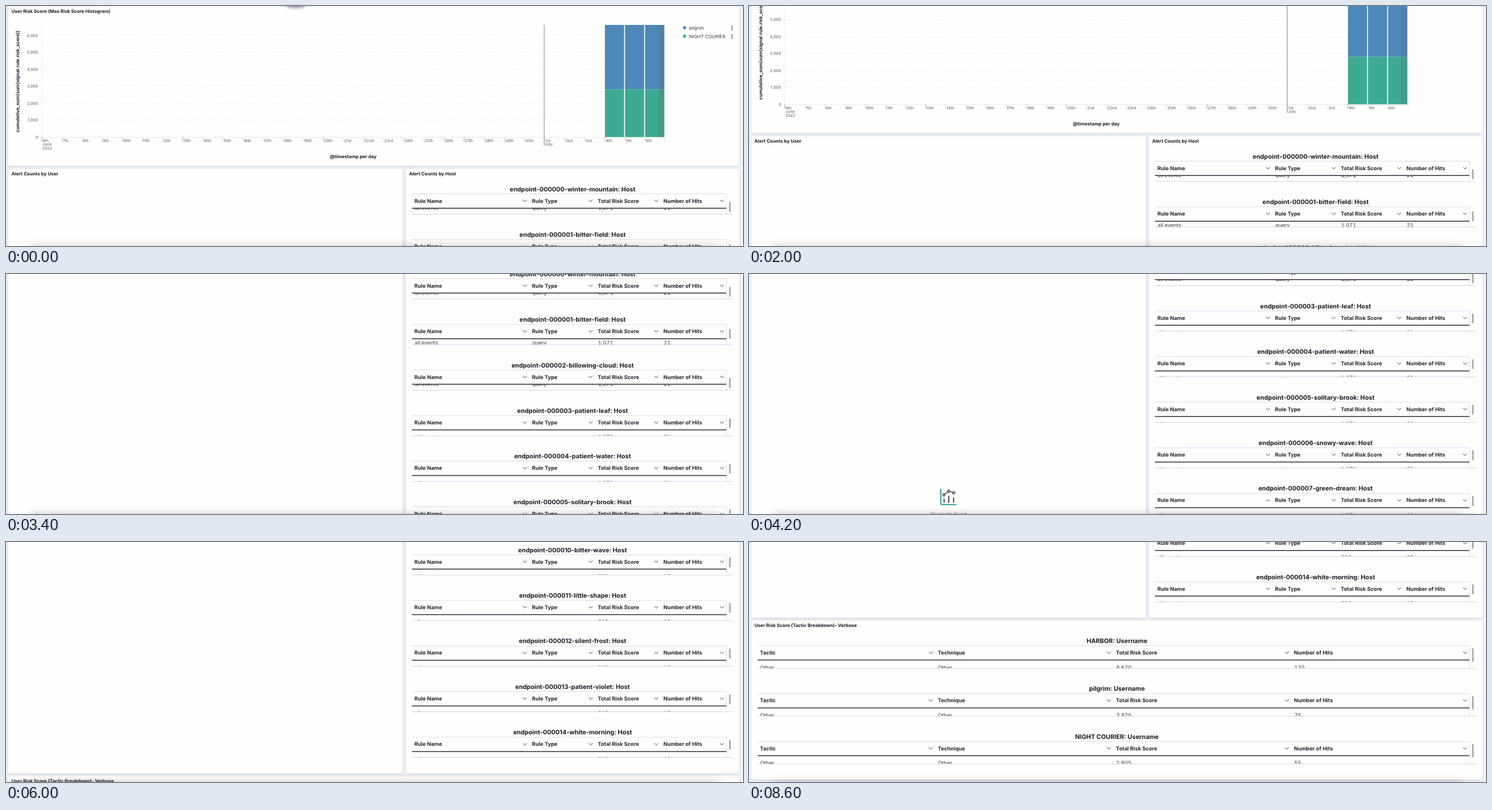
An HTML page that plays this animation: 1280 px wide and 418 px high, repeating every 8800 ms.

```html
<!DOCTYPE html>
<html lang="en">
<head>
<meta charset="utf-8">
<title>Risk dashboard</title>
<style>
  html, body { margin: 0; width: 100%; height: 100%; overflow: hidden; background: #f3f4f9; }
  svg { display: block; }
  text { font-family: Inter, "Noto Sans", sans-serif; font-size: 8.03px; fill: #343741; text-rendering: geometricPrecision; white-space: pre; }
  .bold { font-weight: 700; fill: #1a1c21; }
  .title { font-weight: 700; font-size: 10.75px; fill: #1a1c21; }
  .head { font-weight: 700; font-size: 9.2px; fill: #24262d; }
  .cell { font-size: 9.2px; font-feature-settings: "tnum"; }
  .tick { font-size: 6.9px; fill: #535862; }
  .note { fill: #646a77; }
</style>
</head>
<body>
<svg id="stage" width="100%" height="100%" viewBox="0 0 1280 418">
  <defs>
    <filter id="lift" x="-2%" y="-4%" width="104%" height="108%">
      <feDropShadow dx="0" dy="1" stdDeviation="1.9" flood-color="#3c4668" flood-opacity=".24"/>
    </filter>
    <filter id="soft" x="-20%" y="-200%" width="140%" height="500%">
      <feGaussianBlur stdDeviation="7"/>
    </filter>
    <filter id="smudge" x="-50%" y="-100%" width="200%" height="300%">
      <feGaussianBlur stdDeviation="2"/>
    </filter>
  </defs>
  <g id="page"></g>
  <ellipse id="blob" cx="503" cy="-1" rx="17" ry="4.5" fill="#55556a" opacity=".6" filter="url(#smudge)"/>
  <rect x="42" y="417" width="1196" height="30" fill="#000" opacity=".2" filter="url(#soft)"/>
</svg>
<script>
const LOOP = 8800, STEP = 200, BLOB_END = 1200;
const page = document.getElementById('page');
const blob = document.getElementById('blob');

// y is the middle of the capital letters
const text = (x, y, str, cls, size = 8.03, anchor = 'start') =>
  `<text x="${x}" y="${y + size * 0.364}" class="${cls}" text-anchor="${anchor}">${str}</text>`;
const line = (x1, y1, x2, y2, color, width = 1, extra = '') =>
  `<path d="M${x1} ${y1}L${x2} ${y2}" stroke="${color}" stroke-width="${width}" ${extra}/>`;
const rect = (x, y, w, h, fill, extra = '') =>
  `<rect x="${x}" y="${y}" width="${w}" height="${h}" fill="${fill}" ${extra}/>`;
const panel = (x, y, right, bottom, title) =>
  rect(x, y, right - x, bottom - y, '#fefefd', 'rx="3.5" filter="url(#lift)"') +
  text(9.5 + x - 4, y + 8, title, 'bold');
const chevron = (x, y) =>
  `<path d="M${x - 3} ${y - 1.3}l3 2.8 3-2.8" fill="none" stroke="#343741" stroke-linecap="round" stroke-linejoin="round"/>`;

function ordinal(n) {
  const teen = n > 10 && n < 14;
  return n + (teen ? 'th' : ['th', 'st', 'nd', 'rd'][n % 10] || 'th');
}

function chart() {
  const left = 62, right = 1144, top = 33, base = 228, day = 34.93;
  let s = '';
  for (let i = 0; i <= 6; i++) {
    const y = base - i * 29.45;
    if (i) s += line(left, y, right, y, '#eff0f3', 1, 'stroke-dasharray="4 4"');
    s += text(55.5, y, i ? i + ',000' : '0', 'tick', 6.9, 'end');
  }
  s += line(left, top, left, base, '#eceef1') + line(left, base + .5, right, base + .5, '#e6e8ec');
  for (let i = 0; i <= 31; i++) {
    const x = left + i * day, date = i < 25 ? i + 6 : i - 24;
    s += line(x, base, x, base + 8, i % 7 ? '#d5d7db' : '#a2a5ab');
    if (i < 31) s += text(x + (i && i !== 25 && i !== 28 ? 1.2 : 1.6), 234.6, ordinal(date), 'tick', 6.9);
  }
  s += line(934.7, top, 934.7, 243, '#929498', 1.2);
  s += text(63.3, 240.8, 'June', 'tick', 6.9) + text(63.3, 247.5, '2022', 'tick', 6.9);
  s += text(936, 240.8, 'July', 'tick', 6.9);
  for (let i = 0; i < 3; i++) {
    const x = 1040.2 + i * 34.9;
    s += rect(x, top, 33.3, 112.5, '#4d88b9') + rect(x, 145.5, 33.3, 82.7, '#3dab91');
  }
  s += rect(1132.5, top, 11, 195.2, '#69606d', 'opacity=".25"');
  s += text(603, 262, '@timestamp per day', 'bold', 8.03, 'middle');
  s += `<g transform="translate(20 131.5) rotate(-90)">` +
    text(0, 0, 'cumulative_sum(sum(signal.rule.risk_score))', 'bold', 8.03, 'middle') + '</g>';
  [['pilgrim', '#4d88b9'], ['NIGHT COURIER', '#3dab91']].forEach(([name, color], i) => {
    const y = 37.8 + i * 15;
    s += `<circle cx="1178.5" cy="${y}" r="2.8" fill="${color}"/>` + text(1186.5, y, name, '');
    for (const d of [-3, 0, 3]) s += `<circle cx="1261" cy="${y + .5 + d}" r="1.15" fill="#565a63"/>`;
  });
  return s;
}

// y is the middle of the title; bottom, row and thumb are offsets from it
function table({ left, y, title, cols, xs, cells, bottom, row, thumb, thumbSize }) {
  const right = 1251, top = y + 8.6, rule = y + 33.5, end = y + bottom;
  let s = text((left + 1263) / 2, y, title, 'title', 10.75, 'middle');
  s += `<svg x="${left}" y="${rule}" width="${right - left}" height="${end - rule}">` +
    cells.map((c, i) => text(xs[i] - left + .5, y + row - rule, c, 'cell', 9.2)).join('') + '</svg>';
  s += line(left, top, right, top, '#d9dce3') + line(left, end, 1263, end, '#d3d6dd');
  s += line(right + .3, top, right + .3, end, '#d9dce3') + line(left, rule, right, rule, '#2c2e36', 1.5);
  cols.forEach((c, i) => {
    s += text(xs[i], y + 20.6, c, 'head', 9.2);
    s += chevron((xs[i + 1] || 1255.8) - 12.3, y + 20.6);
  });
  return s + rect(1255.7, y + thumb, 2.9, thumbSize, '#a9abb0', 'rx="1.4"');
}

const hosts = ['winter-mountain', 'bitter-field', 'billowing-cloud', 'patient-leaf', 'patient-water',
  'solitary-brook', 'snowy-wave', 'green-dream', 'falling-sea', 'crimson-smoke', 'bitter-wave',
  'little-shape', 'silent-frost', 'patient-violet', 'white-morning'];
const users = [['HARBOR', '8,670', 170], ['pilgrim', '3,825', 75], ['NIGHT COURIER', '2,805', 55]];

const hostTable = (name, i) => {
  const [row, thumb] = [[32.6, 22.5], [40.2, 16.5], [32.6, 22.5]][i] || [45.8, 13];
  return table({
    left: 705, y: 318.7 + 79.45 * i, row, thumb, thumbSize: 17.5, bottom: 43.8,
    title: `endpoint-${String(i).padStart(6, '0')}-${name}: Host`,
    cols: ['Rule Name', 'Rule Type', 'Total Risk Score', 'Number of Hits'],
    xs: [709.3, 913.5, 1027.8, 1141.7],
    cells: ['all events', 'query', ...(i < 10 ? ['1,071', '21'] : ['918', '18'])]
  });
};

const userTable = ([name, score, hits], i) => table({
  left: 15, y: 1542.4 + 83.3 * i, row: 46.4, thumb: 13, thumbSize: 23.5, bottom: 48,
  title: `${name}: Username`,
  cols: ['Tactic', 'Technique', 'Total Risk Score', 'Number of Hits'],
  xs: [19, 328, 637.3, 946.5],
  cells: ['Other', 'Other', score, hits]
});

function emptyNote() {
  const dots = [[6.5, 10.5], [15, 4], [23.5, 7]];
  return `<g transform="translate(332 875.5)" fill="none" stroke-linecap="round">
    <path d="M1.2 .8V25.5q0 2 2 2H27.5" stroke="#17908f" stroke-width="1.8"/>
    <path d="M6.8 18v5.5M15 13v10.5M23.3 16v7.5" stroke="#343741" stroke-width="1.8"/>
    <path d="M${dots.join('L')}" stroke="#343741" stroke-width="1.4"/>` +
    dots.map(([x, y]) => `<circle cx="${x}" cy="${y}" r="1.9" fill="#fefefd" stroke="#343741" stroke-width="1.4"/>`).join('') +
    '</g>' + text(346.5, 919.2, 'No results found', 'note', 8.03, 'middle');
}

page.innerHTML =
  panel(4, 1, 1273.5, 278, 'User Risk Score (Max Risk Score Histogram)') + chart() +
  panel(4, 283.7, 689, 1502, 'Alert Counts by User') + emptyNote() +
  panel(694.7, 283.7, 1273.5, 1502, 'Alert Counts by Host') + hosts.map(hostTable).join('') +
  panel(4, 1507.3, 1273.5, 1784, 'User Risk Score (Tactic Breakdown)- Verbose') + users.map(userTable).join('');

// scroll positions over time, joined by a monotone cubic
const keys = [[1400, 0], [2000, 57], [3400, 319], [4200, 501.3], [5200, 808.8], [6800, 1319], [7400, 1370.3]];
const rate = i => (keys[i + 1][1] - keys[i][1]) / (keys[i + 1][0] - keys[i][0]);
const slopes = keys.map((_, i) => {
  if (!i || i === keys.length - 1) return 0;
  const a = rate(i - 1), b = rate(i);
  return 2 * a * b / (a + b);
});

function scrollAt(t) {
  const last = keys.length - 1;
  if (t <= keys[0][0]) return 0;
  if (t >= keys[last][0]) return keys[last][1];
  const i = keys.findIndex(k => k[0] > t) - 1;
  const [t0, y0] = keys[i], [t1, y1] = keys[i + 1];
  const h = t1 - t0, u = (t - t0) / h, v = 1 - u;
  return y0 + (y1 - y0) * u * u * (3 - 2 * u) + h * u * v * (slopes[i] * v - slopes[i + 1] * u);
}

function draw(ms) {
  const t = Math.floor(ms % LOOP / STEP) * STEP;
  page.setAttribute('transform', `translate(0 ${-scrollAt(t).toFixed(2)})`);
  blob.style.display = t < BLOB_END ? '' : 'none';
}

const start = performance.now();
function tick() {
  draw(performance.now() - start);
  requestAnimationFrame(tick);
}
tick();
</script>
</body>
</html>
```
